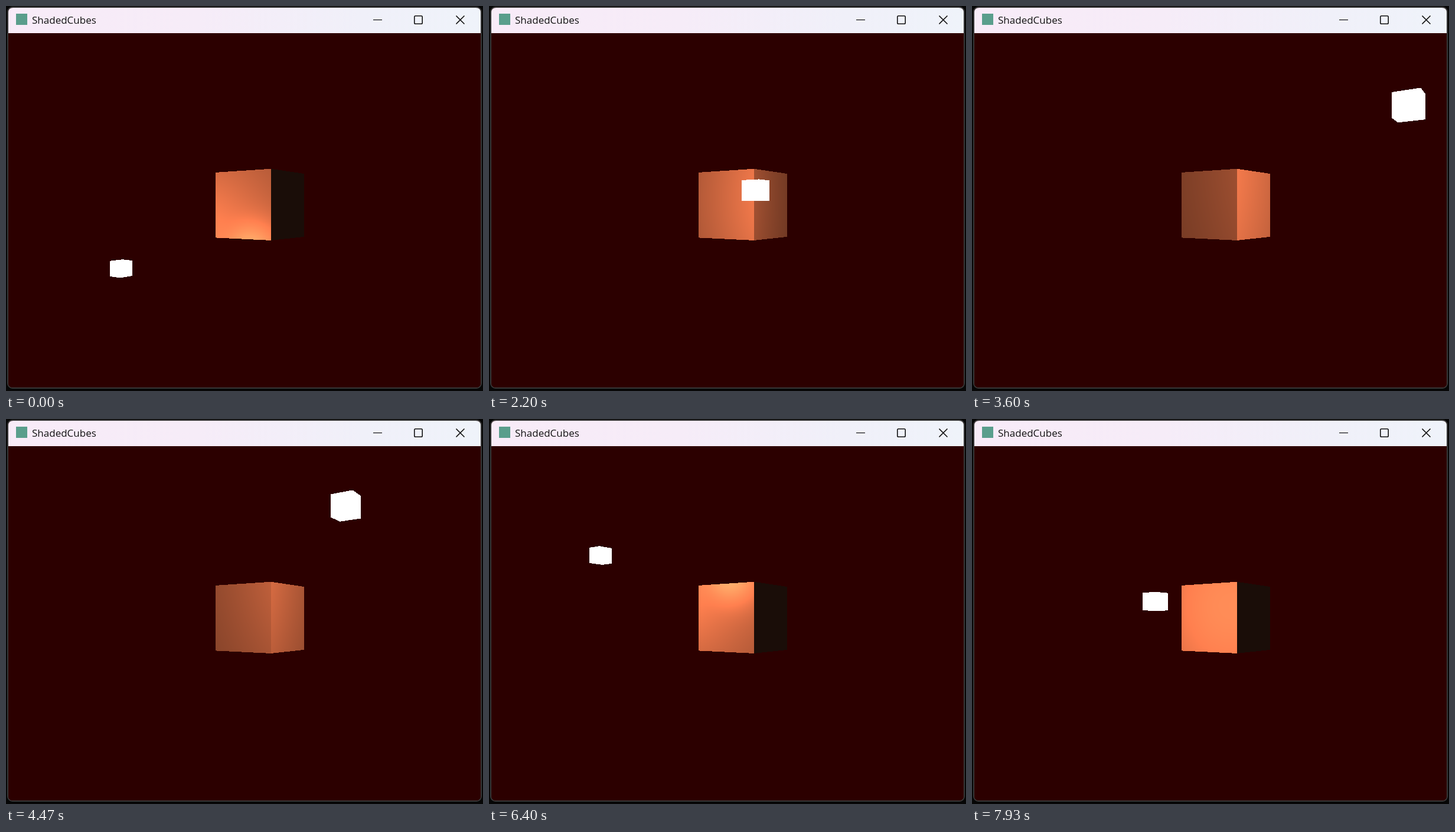
Recreate the animation shown at these times as an HTML page with a canvas. Size 808 by 652 pixels, loop 7990 ms.

```html
<!DOCTYPE html>
<html lang="en">
<head>
<meta charset="utf-8">
<title>Shaded cube</title>
<style>
  html, body { margin: 0; width: 100%; height: 100%; overflow: hidden; background: #060606; }
  svg, canvas { position: absolute; display: block; }
  svg { left: 0; top: 0; }
  canvas { left: 4px; top: 46px; border-radius: 0 0 7px 7px; }
  text { font: 17px "Open Sans", "Noto Sans", sans-serif; fill: #111; }
</style>
</head>
<body>
<svg width="808" height="652" viewBox="0 0 808 652">
  <defs>
    <linearGradient id="bar">
      <stop offset="0" stop-color="#f8ebf8"/>
      <stop offset="0.4" stop-color="#f6ecf8"/>
      <stop offset="0.75" stop-color="#f0f0f9"/>
      <stop offset="1" stop-color="#eff3fa"/>
    </linearGradient>
  </defs>
  <rect x="3" y="2" width="802" height="645" rx="8" fill="#2c0000" stroke="#383838" stroke-width="2"/>
  <path d="M4 46V11Q4 3 12 3H796Q804 3 804 11V46Z" fill="url(#bar)"/>
  <rect x="17" y="13" width="19" height="19" fill="#5a9e8c"/>
  <text x="44" y="30">ShadedCubes</text>
  <g fill="none" stroke="#111" stroke-width="1.6">
    <path d="M622 23.5H637" stroke-width="1.2"/>
    <rect x="691.8" y="16.8" width="13.4" height="13.4" rx="1.8"/>
    <path d="M762.5 16.5L776.5 30.5M776.5 16.5L762.5 30.5"/>
  </g>
</svg>
<canvas id="view" width="800" height="600"></canvas>
<script>
const WIDTH = 800, HEIGHT = 600, LOOP = 7990;
const BACKGROUND = [44, 0, 0], WHITE = [255, 255, 255], CORAL = [255, 127.5, 79];
const FOCAL = HEIGHT / 2 / Math.tan(Math.PI / 8);
const YAW = 35.5 * Math.PI / 180;
const camera = [3.668, -0.08, 5.579];
const right = [Math.cos(YAW), 0, -Math.sin(YAW)];
const forward = [-Math.sin(YAW), 0, -Math.cos(YAW)];
const cube = { centre: [0, 0, 0], half: 0.5 };

const ctx = document.getElementById("view").getContext("2d");
const dot = (a, b) => a[0] * b[0] + a[1] * b[1] + a[2] * b[2];
const sub = (a, b) => [a[0] - b[0], a[1] - b[1], a[2] - b[2]];
const unit = a => { const n = Math.sqrt(dot(a, a)); return a.map(v => v / n); };

function lampAt(seconds) {
  const phase = -1.966 + seconds * 0.998;
  return { centre: [1 + 2 * Math.sin(phase), Math.sin(phase / 2), 2], half: 0.1 };
}

function project(point) {
  const d = sub(point, camera), scale = FOCAL / dot(d, forward);
  return [WIDTH / 2 + dot(d, right) * scale, HEIGHT / 2 - d[1] * scale];
}

function rayThrough(x, y) {
  const sx = (x + 0.5 - WIDTH / 2) / FOCAL, sy = (HEIGHT / 2 - y - 0.5) / FOCAL;
  return [forward[0] + right[0] * sx, sy, forward[2] + right[2] * sx];
}

// Slab test: distance and axis of the face the ray enters.
function hit(ray, { centre, half }) {
  let near = -Infinity, far = Infinity, axis = 0;
  for (let i = 0; i < 3; i++) {
    const middle = (centre[i] - camera[i]) / ray[i], reach = Math.abs(half / ray[i]);
    if (middle - reach > near) { near = middle - reach; axis = i; }
    far = Math.min(far, middle + reach);
  }
  return near < far ? { near, axis } : null;
}

// Phong lighting: ambient, diffuse and specular.
function shade(ray, { near, axis }, lamp) {
  const point = camera.map((v, i) => v + ray[i] * near);
  const side = ray[axis] < 0 ? 1 : -1;
  const toLamp = unit(sub(lamp.centre, point));
  const toEye = unit(sub(camera, point));
  const mirrored = toLamp.map((v, i) => i === axis ? v : -v);
  const diffuse = Math.max(toLamp[axis] * side, 0);
  const specular = 0.5 * Math.max(dot(toEye, mirrored), 0) ** 32;
  return CORAL.map(v => v * (0.1 + diffuse + specular));
}

function colourAt(x, y, lamp) {
  const ray = rayThrough(x, y);
  if (hit(ray, lamp)) return WHITE;
  const face = hit(ray, cube);
  return face ? shade(ray, face, lamp) : BACKGROUND;
}

function bounds({ centre, half }) {
  const xs = [], ys = [];
  for (let i = 0; i < 8; i++) {
    const corner = centre.map((v, axis) => v + (i >> axis & 1 ? half : -half));
    const [x, y] = project(corner);
    xs.push(x);
    ys.push(y);
  }
  const left = Math.floor(Math.min(...xs)) - 1, top = Math.floor(Math.min(...ys)) - 1;
  return [left, top, Math.ceil(Math.max(...xs)) + 1 - left, Math.ceil(Math.max(...ys)) + 1 - top];
}

function paint(box, lamp) {
  const [left, top, width, height] = bounds(box);
  const image = ctx.createImageData(width, height);
  for (let y = 0, i = 0; y < height; y++) {
    for (let x = 0; x < width; x++, i += 4) {
      image.data.set([...colourAt(left + x, top + y, lamp), 255], i);
    }
  }
  ctx.putImageData(image, left, top);
}

function draw(step) {
  const lamp = lampAt(step / 15);
  ctx.fillStyle = `rgb(${BACKGROUND})`;
  ctx.fillRect(0, 0, WIDTH, HEIGHT);
  paint(cube, lamp);
  paint(lamp, lamp);
}

// The picture advances 15 times a second, on 10 ms boundaries.
const stepAt = ms => Math.floor((Math.floor(ms / 10) * 10 + 3.4) * 0.015);

let shown = -1;
const start = performance.now();
function tick() {
  const step = stepAt((performance.now() - start) % LOOP);
  if (step !== shown) draw(shown = step);
  requestAnimationFrame(tick);
}
tick();
</script>
</body>
</html>
```
